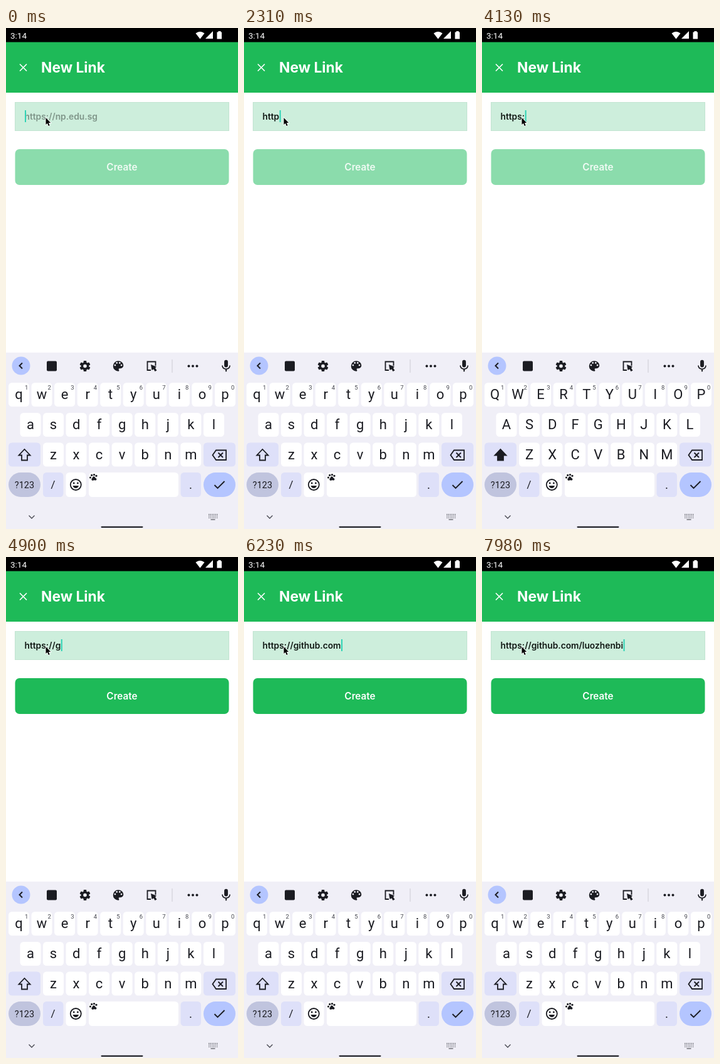
Recreate the animation shown at these times as an HTML page with a canvas. Size 370 by 798 pixels, loop 8 s.

```html
<!DOCTYPE html>
<html lang="en">
<head>
<meta charset="utf-8">
<title>New Link</title>
<style>
  html, body { margin: 0; width: 100%; height: 100%; overflow: hidden; background: #fff; }
  canvas { display: block; width: 370px; height: 798px; }
</style>
</head>
<body>
<canvas id="stage"></canvas>
<script>
const W = 370, H = 798, LOOP = 8000, BLINK = 500;
const GREEN = '#1eba58', INK = '#1b1c22', BOARD = '#f0eff7', BLUE = '#b4c5ff', PALE = '#dee0f9';
const canvas = document.getElementById('stage');
const ctx = canvas.getContext('2d');
const ratio = window.devicePixelRatio || 1;
canvas.width = W * ratio;
canvas.height = H * ratio;

const URL_TEXT = 'https://github.com/luozhenbi';
const HINT = 'https://np.edu.sg';
const FIELD_FONT = '600 13.8px Inter, sans-serif';

// Each edit is the time it happens and the field's content from then on.
const edits = [];
const type = (from, to, start, step) => {
  for (let n = from; n <= to; n++) edits.push([start + (n - from) * step, URL_TEXT.slice(0, n)]);
};
type(1, 5, 1800, 150);
edits.push([2870, 'httpsL'], [3360, 'https']);
type(6, 6, 3780, 0);
type(7, 8, 4400, 150);
type(9, 14, 4830, 140);
type(15, 18, 5740, 130);
type(19, 19, 6580, 0);
type(20, 28, 6860, 130);

const shiftHeld = [[2700, 2940], [3600, 4300]];

function box(x, y, w, h, r, color) {
  ctx.fillStyle = color;
  ctx.beginPath();
  ctx.roundRect(x, y, w, h, r);
  ctx.fill();
}

function disc(x, y, r, color) {
  ctx.fillStyle = color;
  ctx.beginPath();
  ctx.arc(x, y, r, 0, Math.PI * 2);
  ctx.fill();
}

function label(text, x, y, font, color, align = 'center') {
  ctx.font = font;
  ctx.fillStyle = color;
  ctx.textAlign = align;
  ctx.fillText(text, x, y);
}

function stroke(d, width, color = INK) {
  ctx.lineWidth = width;
  ctx.strokeStyle = color;
  ctx.stroke(new Path2D(d));
}

function fill(d, color = INK) {
  ctx.fillStyle = color;
  ctx.fill(new Path2D(d));
}

// Draws in a 24-unit icon grid centred on x, y.
function icon(x, y, scale, draw) {
  ctx.save();
  ctx.translate(x, y);
  ctx.scale(scale, scale);
  ctx.translate(-12, -12);
  draw();
  ctx.restore();
}

function drawHeader() {
  box(0, 0, W, 23, 0, '#000');
  label('3:14', 7, 17, '13.5px Roboto, sans-serif', '#fff', 'left');
  fill('M302.5 8.5Q309.5 3 316.5 8.5L309.5 17.5Z', '#fff');
  fill('M330 5V17H318Z', '#fff');
  fill('M338.5 5H342.5V6.5H344V17.5H336.5V6.5H338.5Z', '#fff');
  box(0, 22.5, W, 80.5, 0, GREEN);
  stroke('M22 57.5L33 68.5M33 57.5L22 68.5', 1.7, '#fff');
  label('New Link', 56, 71, '700 22.8px Inter, sans-serif', '#fff', 'left');
}

function drawForm(text, caretOn) {
  box(14, 118, 342, 46, 0, '#cdeedc');
  ctx.strokeStyle = '#c2e4d1';
  ctx.lineWidth = 1;
  ctx.strokeRect(14.5, 118.5, 341, 45);
  label(text || HINT, 29.5, 146, FIELD_FONT, text ? '#111814' : '#7f9589', 'left');
  if (caretOn) box(30 + (text ? ctx.measureText(text).width : 0), 131, 2, 19, 0, '#2fd3b5');
  const valid = text.length > 8;
  box(14.5, 193, 341, 57, 7, valid ? GREEN : '#8bdcac');
  label('Create', 185, 227, '600 15.3px Inter, sans-serif', valid ? '#fff' : '#f0fbf4');
}

function drawPointer() {
  const d = 'M63.5 143V154L66 151.8L67.8 156L69.7 155.2L67.9 151.1H71.2Z';
  stroke(d, 1.6, '#fff');
  fill(d, '#000');
}

function drawToolbar() {
  disc(24, 538, 14.5, BLUE);
  stroke('M26 533.5L21.5 538L26 542.5', 2);
  box(65, 530.5, 16, 16, 2, INK);

  icon(126, 538.5, 1, () => {
    for (let i = 0; i < 6; i++) {
      ctx.save();
      ctx.translate(12, 12);
      ctx.rotate(i * Math.PI / 3);
      box(-2.3, -8.5, 4.6, 5, 0.8, INK);
      ctx.restore();
    }
    disc(12, 12, 6.3, INK);
    disc(12, 12, 2.8, BOARD);
  });

  icon(179, 538.5, 0.92, () => {
    fill('M12 3a9 9 0 0 0 0 18c.8 0 1.5-.7 1.5-1.5 0-.4-.2-.7-.4-1-.9-1-.2-2.5 1.1-2.5H16c2.8 0 5-2.2 5-5 0-4.4-4-8-9-8z');
    for (const [x, y] of [[6.5, 10.5], [9.5, 6.5], [14.5, 6.5], [17.5, 10.5]]) disc(x, y, 1.5, BOARD);
  });

  stroke('M231 545H225.5V531.5H238.5V538', 1.8);
  fill('M231 536L240 539.5L238 541.5L240.5 545.5L237.5 547L235.5 543.5L232.5 545Z');
  box(264.5, 528, 1, 21, 0, '#cbcbd3');
  for (let i = 0; i < 3; i++) disc(291.5 + i * 6.5, 538.5, 2, INK);

  icon(351, 538.5, 0.98, () => {
    fill('M12 14a3 3 0 0 0 3-3V5a3 3 0 0 0-6 0v6a3 3 0 0 0 3 3z');
    fill('M17.3 11a5.3 5.1 0 0 1-10.6 0H5a7 7 0 0 0 6 6.7V21h2v-3.3a7 7 0 0 0 6-6.7z');
  });
}

function drawLetters(upper) {
  const rows = [['qwertyuiop', 4, 565], ['asdfghjkl', 22.5, 613], ['zxcvbnm', 59, 660.5]];
  for (const [letters, left, top] of rows) {
    [...letters].forEach((c, i) => {
      const x = left + i * 36.55;
      box(x, top, 33, 38, 5.5, '#fff');
      label(upper ? c.toUpperCase() : c, x + 16.5, top + 26, '22px Roboto, sans-serif', INK);
      if (top === 565) label((i + 1) % 10, x + 28.7, top + 11, '9.5px Roboto, sans-serif', '#45464f');
    });
  }
}

function drawActions(upper) {
  box(4, 660.5, 51, 38, 5.5, PALE);
  const arrow = 'M29.5 671L38.5 680.5H34V688.5H25V680.5H20.5Z';
  if (upper) fill(arrow);
  stroke(arrow, 1.8);

  box(315, 660.5, 51, 38, 5.5, PALE);
  stroke('M335 672.5H351V688H335L329.5 680.2Z', 1.8);
  stroke('M338.5 676.5L346 684M346 676.5L338.5 684', 1.8);

  box(4, 708, 51, 39, 19.5, '#c0c4de');
  label('?123', 29.5, 733, '14.5px Roboto, sans-serif', INK);
  box(59, 708, 32.5, 39, 5.5, PALE);
  label('/', 75, 733, '17px Roboto, sans-serif', INK);

  box(95.5, 708, 32, 39, 5.5, '#fff');
  stroke('M119.8 727.5a8.5 8.5 0 1 0 -17 0a8.5 8.5 0 1 0 17 0', 1.8);
  disc(108.2, 725, 1.4, INK);
  disc(114.4, 725, 1.4, INK);
  fill('M106.5 729H116Q114.8 733 111.3 733Q107.8 733 106.5 729Z');

  box(132, 708, 143, 39, 5.5, '#fff');
  for (const [x, y] of [[134.5, 716], [136.7, 712.3], [140.5, 711.5], [144, 713.3]]) disc(x, y, 1.6, INK);
  fill('M139.5 714.3Q141.5 714 142.5 716.5Q145.8 718.4 143.8 720.3Q142.5 721 140.5 720Q138 721.7 136.6 720Q135.6 718.6 137.5 716.8Q138 714.8 139.5 714.3Z');

  box(278.5, 708, 32.5, 39, 5.5, PALE);
  label('.', 294.5, 734, '19px Roboto, sans-serif', INK);
  box(315, 708, 51, 39, 19.5, BLUE);
  stroke('M332.5 728L337.5 733L348.5 722', 1.9);
}

function drawNavigation() {
  stroke('M36.5 776.5L41 781L45.5 776.5', 1.3, '#45464f');
  for (let row = 0; row < 3; row++) {
    for (let i = 0; i < 6; i++) box(323 + i * 2.6, 774 + row * 2.7, 1.4, 1.4, 0, '#65666e');
  }
  box(326.5, 782.3, 7, 1.4, 0, '#65666e');
  box(151.5, 793.7, 67, 2.2, 1.1, '#222329');
}

function draw(t) {
  let text = '', last = null;
  for (const [time, value] of edits) {
    if (time <= t) { text = value; last = time; }
  }
  const phase = last === null ? t + 80 : t - last;
  const caretOn = Math.floor(phase / BLINK) % 2 === 0;
  const upper = shiftHeld.some(([from, to]) => t >= from && t < to);

  ctx.setTransform(ratio, 0, 0, ratio, 0, 0);
  box(0, 0, W, H, 0, '#fff');
  drawHeader();
  drawForm(text, caretOn);
  box(0, 517, W, H - 517, 0, BOARD);
  drawToolbar();
  drawLetters(upper);
  drawActions(upper);
  drawNavigation();
  drawPointer();
}

const start = performance.now();
function tick() {
  draw((performance.now() - start) % LOOP);
  requestAnimationFrame(tick);
}
tick();
</script>
</body>
</html>
```
